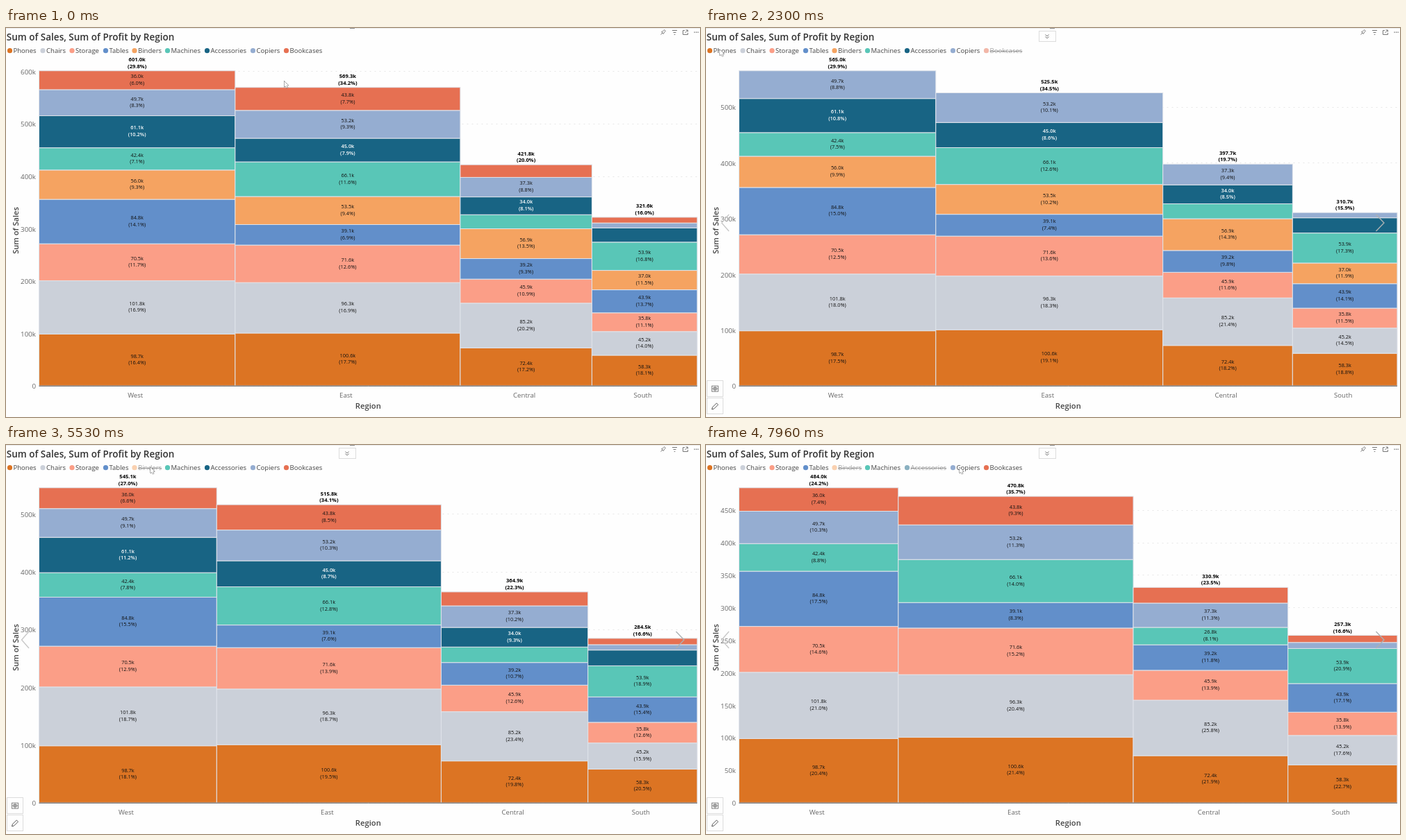
Write an HTML page with a canvas that moves like this. It is 999 by 561 pixels and loops after 8 s.

```html
<!DOCTYPE html>
<html lang="en">
<head>
<meta charset="utf-8">
<title>Sales by region</title>
<style>
  html, body { margin: 0; width: 100%; height: 100%; overflow: hidden; background: #fefefe; }
  canvas { display: block; }
</style>
</head>
<body>
<canvas id="stage" width="999" height="561"></canvas>
<script>
const ctx = document.getElementById('stage').getContext('2d');
const LOOP = 8000, LEFT = 47.5, RIGHT = 995, TOP = 61.7, BASE = 516;

// name, colour, legend dot x, sales in thousands per region
const products = [
  ['Phones', '#dc7423', 5.5, [98.684, 100.615, 72.403, 58.304]],
  ['Chairs', '#cbd0d9', 53, [101.781, 96.261, 85.231, 45.176]],
  ['Storage', '#fb9e87', 95, [70.533, 71.613, 45.93, 35.768]],
  ['Tables', '#628fca', 143.5, [84.755, 39.14, 39.155, 43.916]],
  ['Binders', '#f5a361', 185, [55.961, 53.498, 56.923, 37.029]],
  ['Machines', '#59c6b7', 232.5, [42.444, 66.106, 26.797, 53.89]],
  ['Accessories', '#186484', 289.5, [61.114, 45.033, 33.956, 27.277]],
  ['Copiers', '#95add1', 355.5, [49.749, 53.219, 37.26, 9.299]],
  ['Bookcases', '#e67052', 403.5, [36.004, 43.819, 24.157, 10.899]]
].map(([name, color, x, sales]) => ({ name, color, x, sales }));
const regions = ['West', 'East', 'Central', 'South'];

// start time, hidden products, share of profit per region
const views = [
  { at: 0, hidden: [], share: [29.8, 34.2, 20, 16] },
  { at: 1100, hidden: ['Bookcases'], share: [29.9, 34.5, 19.7, 15.9] },
  { at: 3130, hidden: ['Phones'], share: [31.8, 35.5, 18.4, 14.3] },
  { at: 5530, hidden: ['Binders'], share: [27, 34.1, 22.3, 16.6] },
  { at: 7200, hidden: ['Binders', 'Accessories'], share: [24.2, 35.7, 23.5, 16.6] }
];

// pointer moves: start, end, target x, target y, sag of the path
const moves = [
  [30, 260, 422.5, 27.5, 0],
  [1100, 1200, 424, 31, 0],
  [1760, 2300, 20, 31, 6],
  [4230, 4930, 208, 32, -8],
  [6300, 6500, 328.5, 33, 1],
  [7560, 7960, 365, 32, 0]
];

function text(str, x, y, size, color, align = 'center', weight = 400) {
  ctx.font = `${weight} ${size}px "Open Sans", "Noto Sans", sans-serif`;
  ctx.textAlign = align;
  ctx.fillStyle = color;
  ctx.fillText(str, x, y + size * 0.36);
}

function line(points, color, width = 1, close = false) {
  ctx.beginPath();
  points.forEach(([x, y]) => ctx.lineTo(x, y));
  if (close) ctx.closePath();
  ctx.strokeStyle = color;
  ctx.lineWidth = width;
  ctx.stroke();
}

function label(value, percent, x, y, size, color, weight) {
  text(value.toFixed(1) + 'k', x, y - 4.8, size, color, 'center', weight);
  text(`(${percent.toFixed(1)}%)`, x, y + 4.8, size, color, 'center', weight);
}

function drawLegend(hidden) {
  for (const { name, color, x } of products) {
    const off = hidden.includes(name);
    ctx.globalAlpha = off ? 0.5 : 1;
    ctx.fillStyle = color;
    ctx.beginPath();
    ctx.arc(x, 32.7, 3.6, 0, 7);
    ctx.fill();
    text(name, x + 5, 33, 9.55, '#444', 'left');
    if (off) line([[x + 5, 33.5], [x + 5 + ctx.measureText(name).width, 33.5]], '#444');
    ctx.globalAlpha = 1;
  }
}

function drawChart({ hidden, share }) {
  const shown = products.filter(p => !hidden.includes(p.name));
  const totals = regions.map((_, r) => shown.reduce((sum, p) => sum + p.sales[r], 0));
  const max = Math.max(...totals), scale = (BASE - TOP) / max;
  const step = max < 500 ? 50 : 100;

  for (let v = 0; v <= max; v += step) {
    const y = BASE - v * scale;
    ctx.setLineDash([2, 5]);
    line([[LEFT, Math.round(y) + 0.5], [RIGHT, Math.round(y) + 0.5]], '#e6e6e6');
    ctx.setLineDash([]);
    text(v ? v + 'k' : '0', 43, y + 0.8, 9.8, '#666', 'right');
  }

  let x = LEFT;
  regions.forEach((region, r) => {
    const width = (RIGHT - LEFT) * share[r] / 100, mid = x + width / 2;
    let y = BASE;
    for (const { name, color, sales } of shown) {
      const height = sales[r] * scale, dark = name === 'Accessories';
      y -= height;
      ctx.fillStyle = color;
      ctx.fillRect(x, y, width, height);
      ctx.strokeStyle = '#dfe3ea';
      ctx.lineWidth = 1;
      ctx.strokeRect(x, y, width, height);
      if (height > 23.6) {
        label(sales[r], sales[r] / totals[r] * 100, mid, y + height / 2 - 1, 7.4,
          dark ? '#fff' : '#111', dark ? 600 : 400);
      }
    }
    label(totals[r], share[r], mid, y - 11.4, 7.6, '#000', 700);
    text(region, mid - 2.5, 529.5, 9.6, '#666');
    x += width;
  });
  line([[LEFT, 516.3], [RIGHT, 516.3]], '#555');
}

function drawTitles() {
  text('Sum of Sales, Sum of Profit by Region', 0.8, 13, 13.5, '#333', 'left', 600);
  text('Region', 521.3, 544.6, 11.2, '#444', 'center', 600);
  ctx.save();
  ctx.translate(14.3, 292);
  ctx.rotate(-Math.PI / 2);
  text('Sum of Sales', 0, 0, 11.1, '#444', 'center', 600);
  ctx.restore();
}

function drawHeader() {
  const gray = '#777';
  line([[0, 0.5], [999, 0.5]], '#ebebeb');
  line([[495, 0.5], [502, 0.5]], '#888');
  line([[942.5, 9.5], [945, 7]], gray);
  line([[943.5, 5.5], [946.5, 8.5], [947.5, 6], [949.5, 4.5], [947.5, 2.5], [946, 4.5]], gray, 0.9, true);
  line([[959, 3.5], [966, 3.5]], gray);
  line([[960.5, 6.5], [964.5, 6.5]], gray);
  line([[961.7, 9.5], [963.3, 9.5]], gray);
  line([[977, 3.5], [974.5, 3.5], [974.5, 9.5], [981.5, 9.5], [981.5, 7]], gray);
  line([[978.5, 3], [981.5, 3], [981.5, 5.5]], gray);
  line([[977.5, 7], [981.5, 3]], gray);
  ctx.fillStyle = '#666';
  for (const x of [990.5, 993, 995.5]) ctx.fillRect(x, 5.5, 1.3, 1.3);
}

function drawControls() {
  const dark = '#555';
  for (const [x, y, w, h] of [[479.5, 4.5, 24, 15], [1.5, 508.5, 23, 23], [1.5, 533.5, 23, 23]]) {
    ctx.fillStyle = '#fefefe';
    ctx.fillRect(x, y, w, h);
    ctx.strokeStyle = '#dcdcdc';
    ctx.lineWidth = 1;
    ctx.strokeRect(x, y, w, h);
  }
  for (const y of [9.5, 12.5]) line([[488.5, y], [491, y + 2.3], [493.5, y]], '#666', 0.9);

  ctx.strokeStyle = '#777';
  ctx.lineWidth = 0.9;
  ctx.strokeRect(8.5, 516.2, 9, 8);
  ctx.strokeRect(11, 518.5, 4, 3.5);
  line([[8.5, 520.2], [17.5, 520.2]], '#777', 0.8);
  line([[13, 516.2], [13, 524.2]], '#777', 0.8);
  line([[8.5, 550], [9.3, 547], [15.3, 541], [17.5, 543.2], [11.5, 549.2]], dark, 1, true);

  line([[33, 269], [22.5, 281], [33, 293]], '#c8c8c8', 1.4);
  line([[964.5, 269], [976, 281], [964.5, 293]], '#abb1b3', 1.4);
}

function pointerAt(t) {
  let x = 400.5, y = 76.5;
  for (const [start, end, toX, toY, sag] of moves) {
    if (t < start) break;
    const p = Math.min(1, (t - start) / (end - start));
    const e = p * p * (3 - 2 * p);
    x += (toX - x) * e;
    y += (toY - y) * e + sag * Math.sin(Math.PI * p);
  }
  return [x, y];
}

function drawPointer(t) {
  const [x, y] = pointerAt(t);
  const shape = [[0, 0], [0, 8.6], [2, 6.9], [3.4, 10], [4.8, 9.4], [3.5, 6.4], [6.2, 6.2]];
  ctx.lineJoin = 'round';
  line(shape.map(([dx, dy]) => [x + dx, y + dy]), '#444', 0.9, true);
  ctx.fillStyle = '#fff';
  ctx.fill();
  ctx.lineJoin = 'miter';
}

function draw(now) {
  const t = now % LOOP;
  const view = views.findLast(v => t >= v.at);
  ctx.fillStyle = '#fefefe';
  ctx.fillRect(0, 0, 999, 561);
  drawHeader();
  drawLegend(view.hidden);
  drawChart(view);
  drawTitles();
  if (t >= 500) drawControls();
  drawPointer(t);
  requestAnimationFrame(draw);
}
requestAnimationFrame(draw);
</script>
</body>
</html>
```
